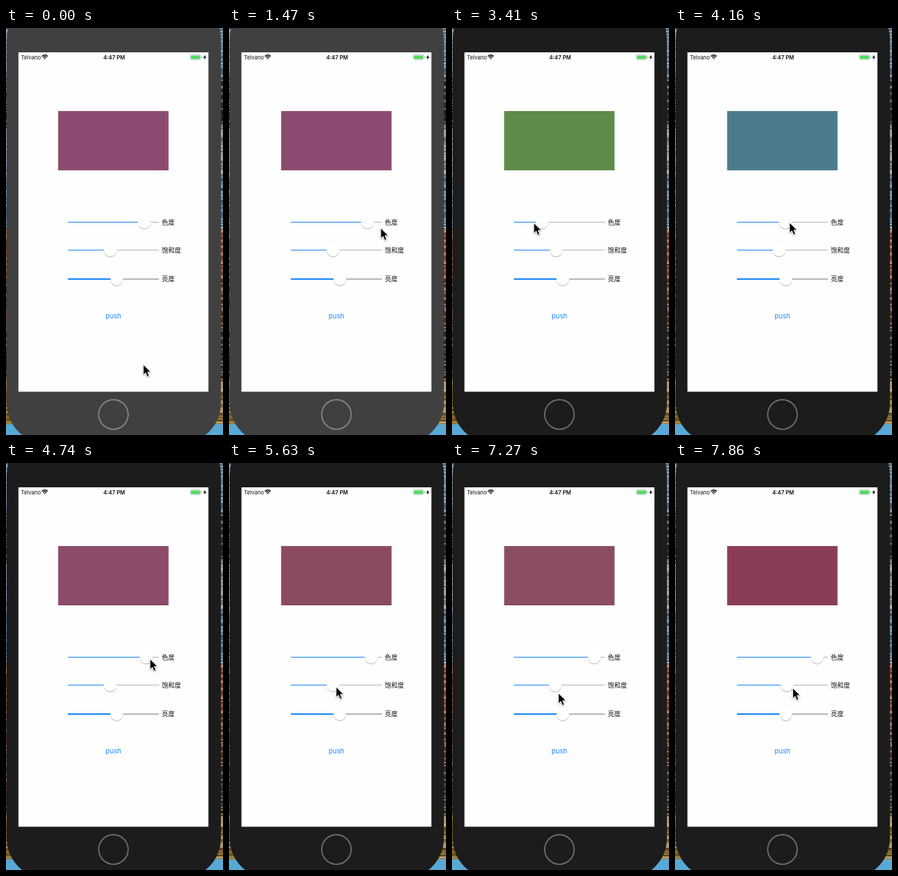
These frames come from a looping animation (305 px wide and 569 px high, 8 s). An HTML page:

```html
<!DOCTYPE html>
<html lang="zh-CN">
<head>
<meta charset="utf-8">
<title>HSB sliders</title>
<style>
html, body { margin: 0; width: 100%; height: 100%; overflow: hidden; background: #111; }
svg { display: block; width: 305px; height: 569px; }
text { font-family: Inter, "Noto Sans CJK SC", "Noto Sans CJK", sans-serif; }
.status { font-size: 7.6px; fill: #111; }
.label { font: 9px "Noto Sans CJK SC", "Noto Sans CJK", sans-serif; fill: #111; }
.side { font-size: 10px; fill: #ddd; }
.rest { stroke: #b7b7b7; }
.fill { stroke: #1a86fb; }
.knob { fill: #fff; filter: drop-shadow(0 1.5px .7px rgba(0, 0, 0, .28)); }
#cursor { filter: drop-shadow(0 1px .8px rgba(0, 0, 0, .35)); }
</style>
</head>
<body>
<svg viewBox="0 0 305 569">
  <g id="desk"></g>
  <g class="side">
    <text x="300" y="171">s</text>
    <text x="300" y="284">n</text>
    <text x="300" y="396">lu</text>
    <text x="300" y="508">e</text>
  </g>
  <rect id="phone" x="1" y="-40" width="301" height="620" rx="55"/>
  <circle id="home" cx="151" cy="540.3" r="20.7" fill="none" stroke-width="1.6"/>
  <rect x="17.5" y="34" width="267" height="474.5" fill="#fefefe"/>

  <g class="status">
    <text x="21" y="43.6">Telvano</text>
    <text x="152" y="43.6" text-anchor="middle" font-weight="600">4:47 PM</text>
  </g>
  <g fill="none" stroke="#111" stroke-width="1.4">
    <path d="M50.4 39.6Q54.5 36 58.6 39.6M52 41.3Q54.5 39.2 57 41.3"/>
    <path d="M53 42.2H56L54.5 44Z" fill="#111" stroke="none"/>
  </g>
  <rect x="258.8" y="37.5" width="15" height="6.8" rx="1.6" fill="#fff" stroke="#b5bab6" stroke-width=".7"/>
  <rect x="259.8" y="38.4" width="13" height="5" rx=".8" fill="#53d863"/>
  <path d="M275 39.8v2.2" stroke="#9aa59b"/>
  <path d="M280.2 37.4L277 41.4H279L278.4 44.4L281.8 40.3H279.7Z" fill="#111"/>

  <rect id="swatch" x="73.3" y="116.1" width="155.2" height="82.9"/>
  <g id="sliders"></g>
  <text x="151" y="405.9" text-anchor="middle" font-size="9.4" fill="#1a86fb">push</text>
  <path id="cursor" d="M0 0V14.6L3.3 11.5L5.6 17L8.3 15.9L6 10.5H10.5Z" stroke="#fff" stroke-width=".9"/>
</svg>
<script>
const LOOP = 8000, STEP = 148.3, LEAD = 14, LAST_STEP = 53;
const FOCUS_STEP = 17, BRIGHTNESS = .545;
const $ = id => document.getElementById(id);

// Key points as [step, ...values], mostly where the hand turns.
const hueKeys = [[16, .9], [17, .84], [23, .281], [25, .2], [28, .539], [33, .948]];
const satKeys = [[38, .46], [45, .69], [50, .42], [53, .56]];
const cursorKeys = [
  [0, 193, 470.5], [8, 221, 289.5], [14, 189, 270.5], [17, 187, 270.5], [23, 115, 272.5], [25, 104, 273.5],
  [28, 161, 272], [33, 205, 275], [38, 150.5, 313], [45, 171.5, 318.5], [50, 147, 322], [53, 165.5, 314.5]
];

function slope(keys, i, j) {
  const rise = n => keys[n + 1] && keys[n] ? (keys[n + 1][j] - keys[n][j]) / (keys[n + 1][0] - keys[n][0]) : 0;
  const before = rise(i - 1), after = rise(i);
  return before * after > 0 ? 2 * before * after / (before + after) : 0;
}

// Smooth curve through the keys that never overshoots them.
function at(keys, step, j = 1) {
  const i = keys.findIndex(key => key[0] > step);
  if (i < 0) return keys[keys.length - 1][j];
  if (i === 0) return keys[0][j];
  const a = keys[i - 1], b = keys[i], span = b[0] - a[0], u = (step - a[0]) / span;
  const ease = u * u * (3 - 2 * u);
  return a[j] + (b[j] - a[j]) * ease
    + span * u * (1 - u) * ((1 - u) * slope(keys, i - 1, j) - u * slope(keys, i, j));
}

function hsb(h, s, b) {
  const channel = n => {
    const q = (n + h * 6) % 6;
    return Math.round(255 * b * (1 - s * Math.max(0, Math.min(q, 4 - q, 1))));
  };
  return `rgb(${channel(5)},${channel(3)},${channel(1)})`;
}

function addGroup(parent, markup) {
  const g = document.createElementNS("http://www.w3.org/2000/svg", "g");
  g.innerHTML = markup;
  return $(parent).appendChild(g);
}

// Blurry wallpaper that peeks out on both sides of the phone.
function drawDesk() {
  const bands = ["#6f8ea6", "#2b2b2e", "#7f8a97", "#4c7394", "#8a4428", "#5a3524", "#3a2a20", "#8a6a24"];
  let seed = 7, markup = "";
  const random = () => (seed = seed * 16807 % 2147483647) / 2147483647;
  const row = (x, y, fill, opacity) =>
    `<rect x="${x}" y="${y}" width="153" height="2" fill="${fill}" opacity="${opacity}"/>`;
  for (let y = 0; y < 569; y += 2) {
    const sky = y > 552;
    for (const x of [0, 152]) {
      markup += row(x, y, sky ? "#58a9d6" : bands[Math.floor(y / 70)], 1);
      if (!sky) markup += row(x, y, random() < .6 ? "#000" : "#fff", random() * .4);
    }
  }
  addGroup("desk", markup);
}

function addSlider(name, y, weight) {
  const g = addGroup("sliders", `<g stroke-width="${weight}"><path class="rest" d="M87 ${y}H215"/><path class="fill"/></g>
    <circle class="knob" cy="${y}" r="9"/><text class="label" x="219" y="${y + 3.2}">${name}</text>`);
  return value => {
    const x = 96 + 109.6 * value;
    g.querySelector(".fill").setAttribute("d", `M87 ${y}H${x}`);
    g.querySelector(".knob").setAttribute("cx", x);
  };
}

drawDesk();
const setHue = addSlider("色度", 271.5, 1.1);
const setSat = addSlider("饱和度", 310.5, 1.2);
addSlider("亮度", 351, 1.8)(BRIGHTNESS);

function draw(now) {
  const step = Math.min(LAST_STEP, Math.floor((now % LOOP + LEAD) / STEP));
  const hue = at(hueKeys, step), sat = at(satKeys, step), active = step >= FOCUS_STEP;
  setHue(hue);
  setSat(sat);
  $("swatch").setAttribute("fill", hsb(hue, sat, BRIGHTNESS));
  $("cursor").setAttribute("transform", `translate(${at(cursorKeys, step)} ${at(cursorKeys, step, 2)})`);
  $("phone").setAttribute("fill", active ? "#1c1c1c" : "#404040");
  $("home").setAttribute("stroke", active ? "#747474" : "#8a8a8a");
  requestAnimationFrame(draw);
}
draw(performance.now());
</script>
</body>
</html>
```
